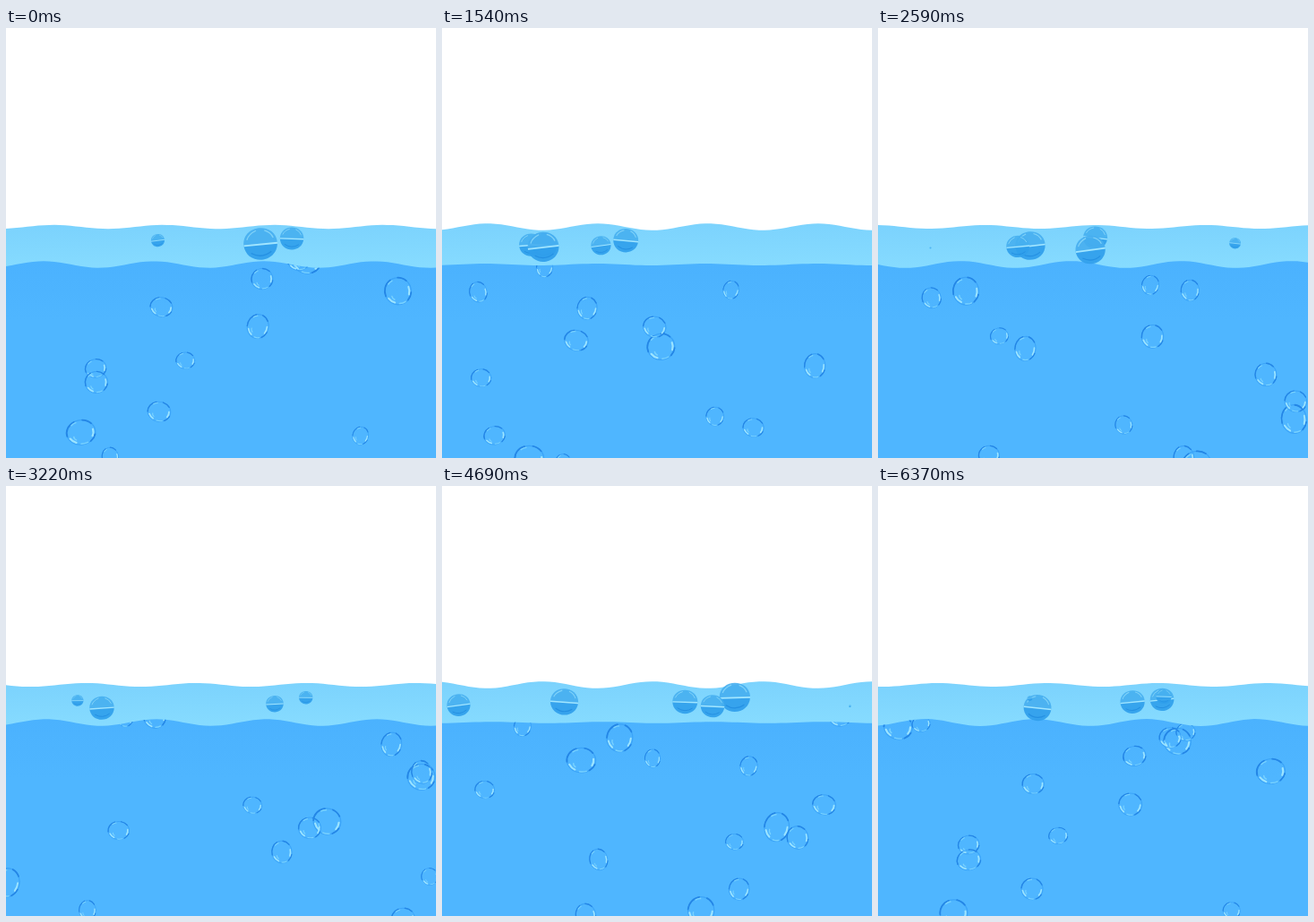
These frames come from a looping animation (480x480 px, 6.44 s). An HTML page:

```html
<!DOCTYPE html>
<html lang="en">
<head>
<meta charset="utf-8">
<title>Bubbles</title>
<style>
  html, body { margin: 0; width: 100%; height: 100%; overflow: hidden; background: #fff; }
  svg { display: block; width: 100vw; height: 100vh; }
</style>
</head>
<body>
<svg viewBox="0 0 480 480" preserveAspectRatio="xMidYMid meet">
  <defs>
    <linearGradient id="top" x1="0" y1="0" x2="0.1" y2="1">
      <stop offset="0" stop-color="#7bd2fd"/>
      <stop offset="1" stop-color="#87dcff"/>
    </linearGradient>
    <linearGradient id="deep" x1="0" y1="0" x2="0" y2="1">
      <stop offset="0" stop-color="#4bb2fe"/>
      <stop offset="0.3" stop-color="#4fb6ff"/>
    </linearGradient>
    <clipPath id="under"><path id="underPath"/></clipPath>
    <g id="ring" fill="none" stroke-linecap="round">
      <circle r="9.3" stroke="#3ba4f8" stroke-width="0.8"/>
      <path d="M-9.2 1.5A9.3 9.3 0 0 1-3.5-8.6M2-9.1A9.3 9.3 0 0 1 7.4-5.6M8.8 3A9.3 9.3 0 0 1 5.4 7.6" stroke="#2486e6" stroke-width="1.1"/>
      <path d="M-7.6 3.4A8.3 8.3 0 0 0-4 7.2M7.9-1.2A8.1 8.1 0 0 1 7 4" stroke="#9ce4ff" stroke-width="1.3"/>
      <path d="M-5 2.5Q-5.2 4-3.7 5.2M-1 8.6Q1.5 9 3.5 8.2M-5.5-6.2Q-4-7.6-2.4-7.8" stroke="#78d2ff" stroke-width="0.9"/>
    </g>
    <g id="dome">
      <path d="M-10 0C-9.7-12.4 9.7-12.4 10 0Z" fill="#46aff0" fill-opacity="0.9"/>
      <path d="M-10 0C-9.3 12.6 9.3 12.6 10 0Z" fill="#309fec" fill-opacity="0.92"/>
      <path d="M-7.8-3Q-6.5-6.4-2-8M3-7.7Q6.5-6.4 7.8-3" fill="none" stroke="#80d2f8" stroke-width="0.7"/>
      <path d="M-9.9 0.3H10" stroke="#a2e6ff" stroke-width="1"/>
      <path d="M-6 5Q0 9 6 5" fill="none" stroke="#2590e2" stroke-width="0.7"/>
    </g>
  </defs>
  <path id="band" fill="url(#top)"/>
  <path id="body" fill="url(#deep)"/>
  <g id="rising" clip-path="url(#under)"></g>
  <g id="floating"></g>
</svg>
<script>
const STEP = 70, STEPS = 92, CYCLE = 93, WAVE = 123, SMALL = 43;
const $ = id => document.getElementById(id);
const mod = (a, n) => ((a % n) + n) % n;

let seed = 29;
function random() {
  seed = (seed * 16807) % 2147483647;
  return seed / 2147483647;
}

function addUse(parent, href) {
  const el = document.createElementNS('http://www.w3.org/2000/svg', 'use');
  el.setAttribute('href', href);
  return $(parent).appendChild(el);
}

// start is the step at which a bubble enters at the bottom
function makeBubble(x, start, r) {
  return {
    x, start, r,
    level: 234 + 15 * random(),
    tilt: 20 * random() - 10,
    speed: 9.3 + (r - 10) * 0.52,
    ring: addUse('rising', '#ring'),
    dome: addUse('floating', '#dome')
  };
}

// Large bubbles: x, start
const large = [
  [243, 12], [99, 22], [464, 33.5], [357, 37.5], [0, 43], [199, 51], [154, 53],
  [374, 59], [289, 66.5], [21, 74], [334, 75.3], [438, 78], [85, 90.7]
].map(([x, start]) => makeBubble(x, start, 16));

const small = Array.from({ length: SMALL }, (_, i) =>
  makeBubble(500 * random() - 10, (i + random()) * CYCLE / SMALL, 10 + 3.6 * random()));

const bubbles = [...large, ...small];

function edge(mid, amp, crest) {
  const pts = [];
  for (let x = 0; x <= 480; x += 6) {
    const y = mid - amp * Math.cos((x - crest) / WAVE * 2 * Math.PI);
    pts.push(x + ' ' + y.toFixed(2));
  }
  return 'M' + pts.join('L');
}

function place(el, visible, transform) {
  el.setAttribute('visibility', visible ? 'visible' : 'hidden');
  if (visible) el.setAttribute('transform', transform);
}

function drawBubble(b, t) {
  const age = mod(t - b.start + 4, CYCLE) - 4;
  const y = 480 - b.speed * age;
  const afloat = age - (480 - b.level) / b.speed;
  const phase = age * 0.55 + b.x;
  const s = b.r / 10, squash = 0.08 * Math.sin(phase);
  const x = b.x + 1.5 * Math.sin(age * 0.35 + b.x);
  place(b.ring, afloat < 0 && y < 500,
    `translate(${x} ${y}) rotate(${14 * Math.sin(phase * 0.7)}) scale(${s * (1 - squash)} ${s * (1 + squash)})`);

  // Surface points converge toward the middle with distance
  const depth = 0.9 + (b.level - 241) * 0.0065;
  const width = Math.min(afloat * (2.5 + 0.17 * b.r), 2.65 * b.r);
  place(b.dome, afloat > 0.3 && afloat < 9,
    `translate(${240 + (b.x - 240) * depth} ${b.level}) rotate(${b.tilt}) scale(${width / 20})`);
}

// The swell passes back and forth between the two edges, twice per cycle
function draw(t) {
  const turn = t / CYCLE * 2 * Math.PI;
  const travel = t * 4 * WAVE / CYCLE;
  const swell = Math.cos(2 * turn + 0.745);
  const drift = 70 - 30 * Math.cos(turn - 0.96);
  const back = edge(222, 2.9 - swell, drift - travel);
  const front = edge(264, 2.4 + 1.7 * swell, 42 - travel) + 'V480H0Z';
  $('band').setAttribute('d', back + 'V272H0Z');
  $('body').setAttribute('d', front);
  $('underPath').setAttribute('d', front);
  bubbles.forEach(b => drawBubble(b, t));
}

const begin = performance.now();
function tick() {
  draw(Math.floor((performance.now() - begin) / STEP) % STEPS);
  requestAnimationFrame(tick);
}
tick();
</script>
</body>
</html>
```
